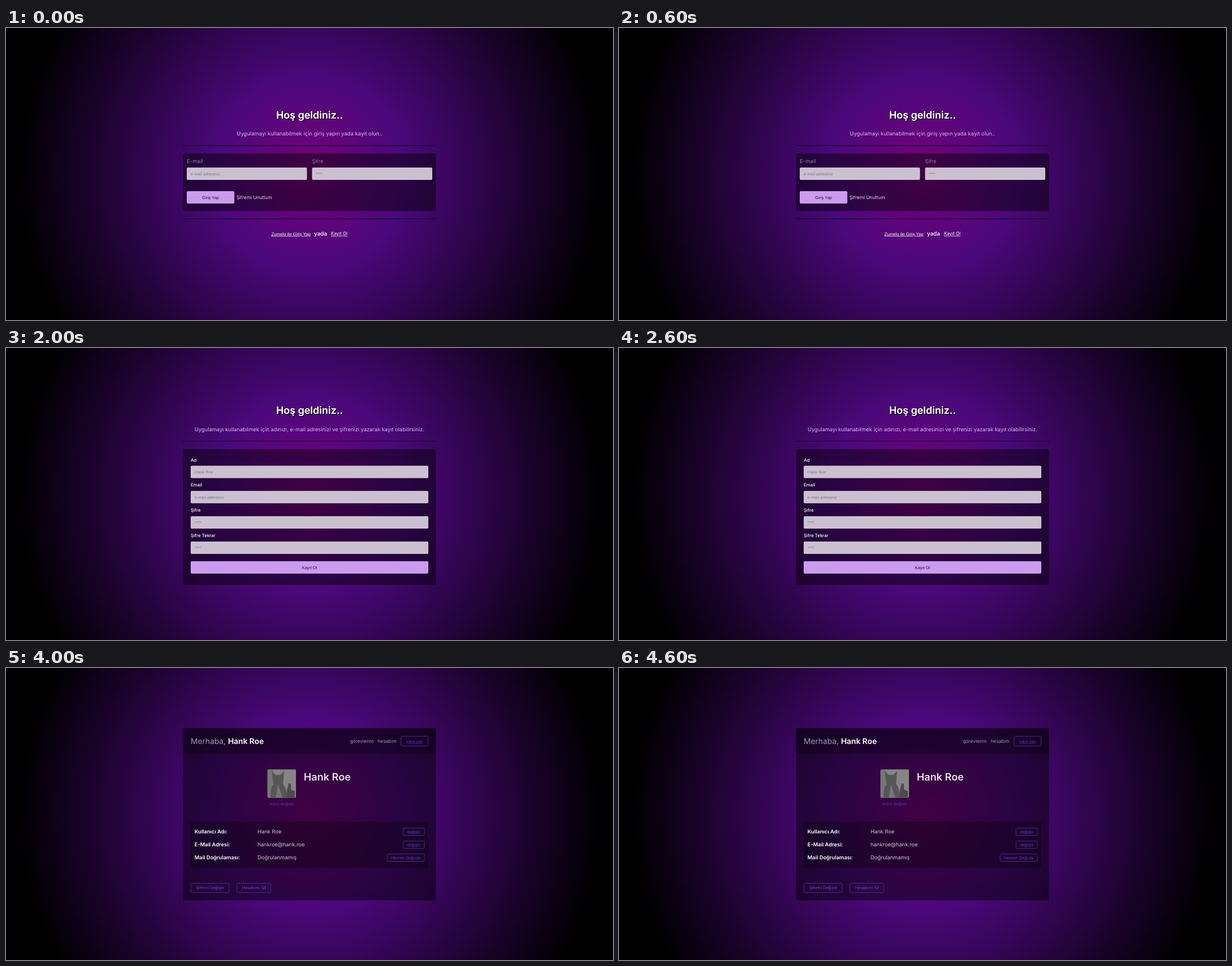
Write an HTML page that moves like this. It is 1078x519 px and loops after 5 s.

```html
<!DOCTYPE html>
<html lang="tr">
<head>
<meta charset="utf-8">
<title>Görevler</title>
<style>
  html, body { margin: 0; width: 100%; height: 100%; overflow: hidden; background: #000; }
  svg { display: block; width: 100%; height: 100%; }
  text { font-family: Inter, "Open Sans", sans-serif; text-rendering: geometricPrecision; white-space: pre; }
  .ui { font-family: "Liberation Sans", Arial, sans-serif; }
</style>
</head>
<body>
<svg id="stage" viewBox="0 0 1078 519" xmlns="http://www.w3.org/2000/svg">
  <defs>
    <radialGradient id="glow" gradientUnits="userSpaceOnUse" cx="539" cy="259.5" r="539">
      <stop offset="0" stop-color="#75007a"/>
      <stop offset=".31" stop-color="#4b087b"/>
      <stop offset=".96" stop-color="#000"/>
    </radialGradient>
    <filter id="shade" x="-10%" y="-30%" width="120%" height="170%">
      <feDropShadow dx="1.4" dy="1.6" stdDeviation=".5" flood-color="#000" flood-opacity=".95"/>
    </filter>
  </defs>
  <rect width="1078" height="519" fill="url(#glow)"/>
</svg>
<script>
const STEP = 1000;
const USER = 'Hank Roe';
const LILAC = '#d9b6f3', FIELD = '#cbc0d0', HINT = '#817788', BUTTON = '#cb9bee';
const DIM = '#a297ab', LINK = '#6837d8', EDGE = '#4c2a80', INK = '#24102f';

const box = (x, y, x2, y2, fill, r = 0, more = '') =>
  `<rect x="${x}" y="${y}" width="${x2 - x}" height="${y2 - y}" rx="${r}" fill="${fill}" ${more}/>`;
const text = (s, x, y, size, fill = '#fff', more = '') =>
  `<text x="${x}" y="${y}" font-size="${size}" fill="${fill}" ${more}>${s}</text>`;
const mid = (s, x, y, size, fill, more = '') =>
  text(s, x, y, size, fill, 'text-anchor="middle" ' + more);
const ui = (s, x, y, fill, more = '', size = 7.45) =>
  text(s, x, y, size, fill, 'class="ui" ' + more);
const label = (s, x, y, fill, more = '', size) =>
  ui(s, x, y, fill, 'text-anchor="middle" ' + more, size);

const panel = (y, y2, r = 2) => box(314.5, y, 763.5, y2, 'rgba(0,0,0,.46)', r);
const shadeBox = (x, y, x2, y2, r = 0) => box(x, y, x2, y2, 'rgba(0,0,0,.3)', r);
const rule = y => box(314.5, y - .6, 763.5, y + .6, '#17002b');
const title = (s, y, size = 18) => mid(s, 539, y, size, '#fff', 'font-weight="600" filter="url(#shade)"');
const field = (x, y, x2, hint, h = 22) =>
  box(x, y, x2, y + h, FIELD, 2) + ui(hint, x + 6.8, y + h / 2 + 2.7, HINT);
const button = (x, y, x2, y2, s, fill, ink, more) =>
  box(x, y, x2, y2, fill, 2) + label(s, (x + x2) / 2, (y + y2) / 2 + 2.7, ink, more);
const ghost = (x, y, x2, y2, s, ink = LINK, more = '') =>
  box(x + .5, y + .5, x2 - .5, y2 - .5, 'none', 2, `stroke="${EDGE}"`) +
  label(s, (x + x2) / 2, (y + y2) / 2 + 2.7, ink, more);

const login = () =>
  title('Hoş geldiniz..', 160.5) +
  mid('Uygulamayı kullanabilmek için giriş yapın yada kayıt olun..', 539, 191.3, 9.47, LILAC) +
  rule(209) + panel(223, 325.3) +
  text('E-mail', 321, 240, 9.6, '#8f8298') + text('Şifre', 543.5, 240, 9.2, '#8f8298') +
  field(321, 248, 534.5, 'e-mail adresiniz') + field(543.5, 248, 757, '****') +
  button(321, 290, 405.5, 312, 'Giriş Yap', BUTTON, INK) +
  text('Şifremi Unuttum', 409.3, 303.7, 8.25, '#eadcf4') +
  rule(339) +
  ui('Zumelo ile Giriş Yap', 471.3, 368.7, '#fff', 'text-decoration="underline"', 7.8) +
  text('yada', 547, 369, 10, '#fff', 'font-weight="500"') +
  text('Kayıt Ol', 577, 368.4, 8.1, '#fff', 'text-decoration="underline"');

const forgot = () =>
  title('Şifremi Unuttum!', 207, 18.6) +
  mid('E-mail adresinizi yazıp "Şifreyi Sıfırla" butonuna tıklayın ve ardından mail adresinize gelen mail ile', 539, 238, 9.38, LILAC) +
  mid('şifrenizi sıfırlayın.', 539, 252, 9.38, LILAC) +
  rule(269.5) + panel(283.5, 332.3) +
  text('email:', 321, 311, 9.7, '#fff') +
  field(355, 296.7, 626.3, 'e-mail adresiniz..') +
  button(656, 296.7, 752.5, 318.7, 'Şifreyi Sıfırla', BUTTON, INK);

const signup = () => {
  const rows = [['Ad', USER], ['Email', 'e-mail adresiniz'], ['Şifre', '****'], ['Şifre Tekrar', '****']];
  return title('Hoş geldiniz..', 117.3) +
    mid('Uygulamayı kullanabilmek için adınızı, e-mail adresinizi ve şifrenizi yazarak kayıt olabilirsiniz.', 539, 148.3, 9.37, LILAC) +
    rule(165.7) + panel(180, 421.3) +
    rows.map(([name, hint], i) =>
      text(name, 328, 201.5 + 44.9 * i, 7.9, '#fff', 'font-weight="500"') +
      field(328, 209.2 + 44.9 * i, 750, hint)).join('') +
    button(328, 379, 750, 401, 'Kayıt Ol', BUTTON, INK);
};

// Greeting bar shared by the two signed-in pages
const header = y =>
  shadeBox(314.5, y, 763.5, y + 46.3) +
  text(`Merhaba, <tspan font-weight="600" fill="#fff">${USER}</tspan>`, 328, y + 28, 13.85, DIM) +
  text('görevlerim', 611, y + 26.3, 8.35, DIM) + text('hesabım', 660, y + 26.3, 8.45, DIM) +
  ghost(701, y + 14, 750, y + 32.4, 'çıkış yap', '#5c2bd8', 'text-decoration="underline"');

const tasks = () =>
  panel(104, 220) + header(104) +
  text('Yapılacak birşeyler ekleyin..', 328, 174, 9.28, DIM) +
  box(328, 184.4, 683, 206.6, '#d4d2d6', 2) +
  ui('spor yap..', 334.8, 198.2, HINT) + box(334.5, 191, 335.2, 200, '#222') +
  button(687, 184.4, 750, 206.6, 'Ekle', '#533285', '#e4dcea', 'font-weight="700"') +
  panel(240, 416) +
  text('Eklediğiniz Görevler', 328, 265, 10, '#fff', 'font-weight="500"') +
  box(328, 282, 750, 283, '#67466f') +
  ['spor yap', 'ders çalış', 'yemek yap'].map((s, i) => {
    const y = 296 + 37.7 * i;
    return shadeBox(328, y, 750, y + 30.8, 1) +
      text(s, 334.8, y + 19, 9.35, DIM, i ? '' : 'text-decoration="line-through"') +
      button(658.7, y + 7, 715, y + 24.4, 'Tamamladım', '#9468d4', '#3c1266') +
      button(721.7, y + 7, 743.3, y + 24.4, 'Sil', '#50263f', '#8b2d47');
  }).join('');

const photo = () =>
  box(464.3, 180.3, 515, 230.7, '#858585', 2) +
  box(465, 181, 474, 230, '#767676') +
  '<path d="M470 230.5 Q469 213 475 207 L472 183 L479 190 H487 L494 183 L492 206 Q499 216 499 230.5Z" fill="#565656"/>' +
  '<path d="M479 230.5 L483 206 L491 230.5Z" fill="#757575"/>' +
  '<path d="M499 217 L502 205 L506 206 L506 216 L513 219 V230.5 H498Z" fill="#4c4c4c"/>';

const account = () => {
  const rows = [
    ['Kullanıcı Adı:', USER, 'değiştir', 704.7],
    ['E-Mail Adresi:', 'hankroe@hank.roe', 'değiştir', 704.7],
    ['Mail Doğrulaması:', 'Doğrulanmamış', 'Hemen Doğrula', 676.5]
  ];
  return panel(106.8, 413) + header(106.8) + photo() +
    text(USER, 528.7, 199.7, 18.2, '#e8e0ec', 'font-weight="600"') +
    label('resmi değiştir', 489.5, 244.2, '#5f31cb') +
    shadeBox(328, 273, 750, 355, 1) +
    rows.map(([name, value, action, x], i) => {
      const y = 291 + 23 * i;
      return text(name, 334.8, y + 3.2, 9.3, '#fff', 'font-weight="600"') +
        text(value, 446.8, y + 3.2, 9.4, '#cfc5d6') +
        ghost(x, y - 7, 743.5, y + 7.2, action);
    }).join('') +
    ghost(328, 382, 396.7, 399.5, 'Şifremi Değiştir', '#7644d8') +
    ghost(409.7, 382, 470.7, 399.5, 'Hesabımı Sil', '#7644d8');
};

const stage = document.getElementById('stage');
const pages = [login, forgot, signup, tasks, account].map(make => {
  const g = document.createElementNS('http://www.w3.org/2000/svg', 'g');
  g.innerHTML = make();
  return stage.appendChild(g);
});

function draw(t) {
  const now = Math.floor(t / STEP) % pages.length;
  pages.forEach((g, i) => g.setAttribute('display', i === now ? 'inline' : 'none'));
}

const start = performance.now();
function tick() {
  draw(performance.now() - start);
  requestAnimationFrame(tick);
}
tick();
</script>
</body>
</html>
```
